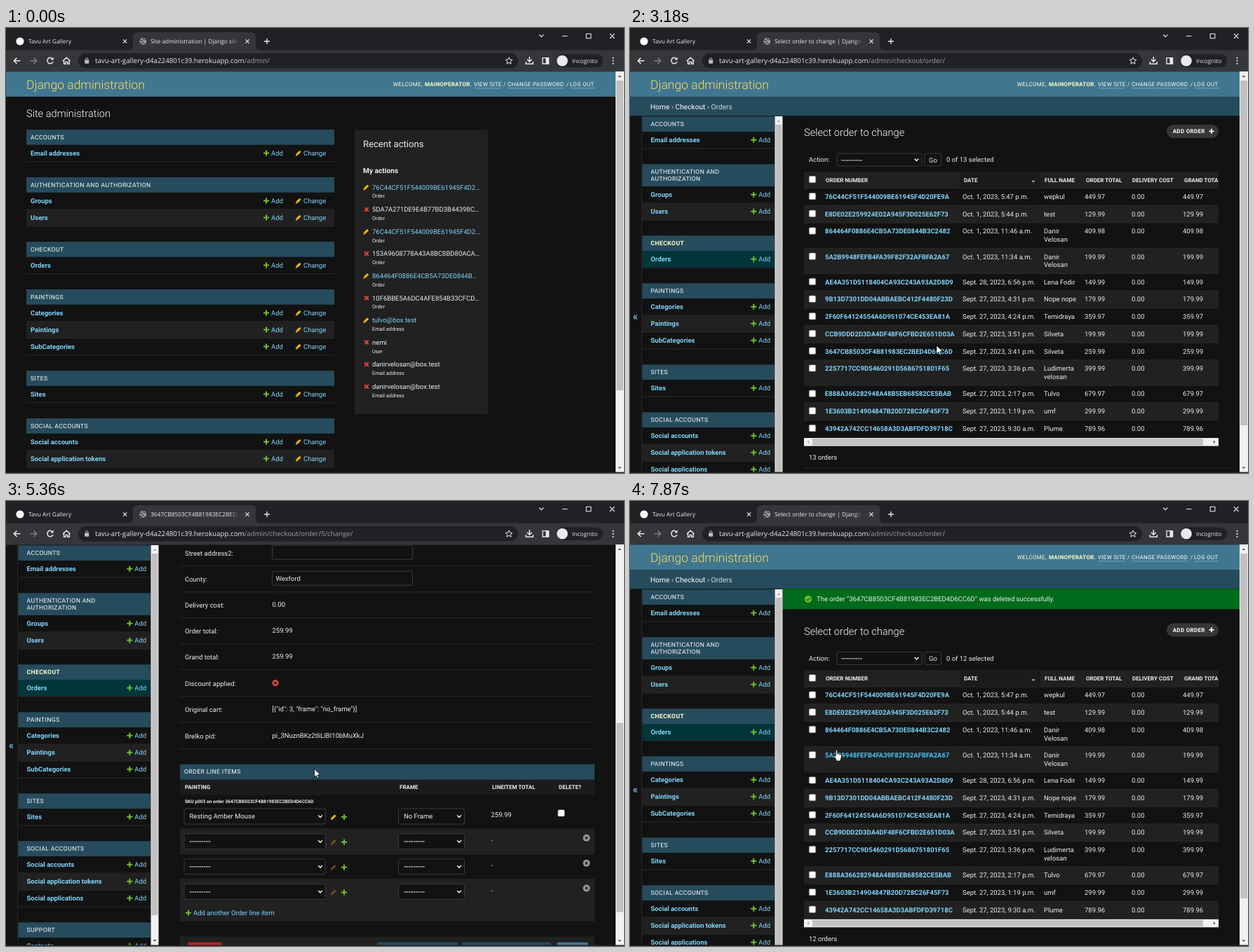
These frames come from a looping animation (881 by 635 pixels, 8000 ms). An HTML page:

```html
<!DOCTYPE html>
<html lang="en">
<head>
<meta charset="utf-8">
<title>Admin walkthrough</title>
<style>
html, body { margin: 0; width: 100%; height: 100%; overflow: hidden; background: #121212; }
svg { display: block; width: 100vw; height: 100vh; font-family: Roboto, sans-serif; text-rendering: geometricPrecision; }
.ui { font-family: "Open Sans", sans-serif; }
.on { fill: #4ac1f7; }
rect.on { fill: #a41515; }
</style>
</head>
<body>
<svg id="stage" viewBox="0 0 881 635"></svg>
<script>
const LOOP = 8000;
const BLUE = '#81d4fa', TEAL = '#264b5d', STEEL = '#417690', DIM = '#212121', LINE = '#2a2a2a',
      TEXT = '#eee', GREEN = '#70bf2b', GOLD = '#efb80b', RED = '#dd4646', UI = '#e8eaed';
const HASH = '3647CB8503CF4B81983EC2BED4D6CC6D';
const HOST = 'tavu-art-gallery-d4a224801c39.herokuapp.com';

// Drawing helpers; text is placed by the vertical centre of its capitals.
const rect = (x, y, w, h, fill, r = 0, more = '') =>
  `<rect x="${x}" y="${y}" width="${w}" height="${h}" rx="${r}" fill="${fill}" ${more}/>`;
const text = (x, cy, s, size = 9.5, fill = TEXT, weight = 400, more = '') =>
  `<text x="${x}" y="${cy + size * .355}" font-size="${size}" fill="${fill}" font-weight="${weight}" ${more}>${s}</text>`;
const path = (d, stroke, width = 1.2, fill = 'none', more = '') =>
  `<path d="${d}" stroke="${stroke}" stroke-width="${width}" fill="${fill}" ${more}/>`;
const circle = (x, y, r, fill, more = '') => `<circle cx="${x}" cy="${y}" r="${r}" fill="${fill}" ${more}/>`;
const hit = (x1, x2, y1, y2) => `data-hit="${x1},${x2},${y1},${y2}"`;
const rule = (x, y, w) => rect(x, y - .5, w, 1, LINE);
const upper = (x, cy, s, weight = 400, fill = '#fff') =>
  text(x, cy, s, 8.7, fill, weight, 'letter-spacing=".365"');
const plus = (x, y, c = GREEN, r = 4, w = 2) => path(`M${x - r} ${y}h${2 * r}M${x} ${y - r}v${2 * r}`, c, w);
const cross = (x, y, c, r, w) => path(`M${x - r} ${y - r}l${2 * r} ${2 * r}m0 ${-2 * r}l${-2 * r} ${2 * r}`, c, w);
const pencil = (x, y, dim) => `<g opacity="${dim ? .35 : 1}">` +
  path(`M${x - 2.4} ${y + 2.2}L${x + 2.6} ${y - 2.6}`, GOLD, 3) +
  path(`M${x - 4.2} ${y + 4.2}l.8 -3 2.2 2.2Z`, 'none', 0, GOLD) + '</g>';
const chevron = (x, y) => path(`M${x - 2.8} ${y - 1.5}l2.8 2.9 2.8 -2.9`, '#fff', 1.4);
const box = (x, y, w, h) => rect(x, y, w, h, '#121212', 2.5, 'stroke="#3a3a3a" stroke-width="1"');
const select = (x, cy, w, s = '---------', h = 22, pad = 7.5) =>
  box(x, cy - h / 2, w, h) + (s[0] === '-' ? text(x + pad, cy, s, 10.2, '#fff', 500) : text(x + pad, cy, s)) +
  chevron(x + w - 7.5, cy);
const check = (x, cy) => rect(x - 4.7, cy - 4.7, 9.4, 9.4, '#fff', 1.5, 'stroke="#767676" stroke-width=".6"');
const pill = (x, y, w, s, pad) =>
  rect(x, y, w, 19, '#363636', 9.5) + text(x + pad, y + 9.2, s, 8, '#fff', 700, 'letter-spacing=".3"');
const tri = (x, y, dx, dy, c = '#505050') => path(
  dx ? `M${x - dx} ${y - 2.6}v5.2l${2.4 * dx} -2.6Z` : `M${x - 2.6} ${y - dy}h5.2l-2.6 ${2.4 * dy}Z`, 'none', 0, c);

const apps = [
  ['ACCOUNTS', 'Email addresses'],
  ['AUTHENTICATION AND AUTHORIZATION', 'Groups', 'Users'],
  ['CHECKOUT', 'Orders'],
  ['PAINTINGS', 'Categories', 'Paintings', 'SubCategories'],
  ['SITES', 'Sites'],
  ['SOCIAL ACCOUNTS', 'Social accounts', 'Social application tokens', 'Social applications'],
  ['SUPPORT', 'Contacts']
];

function modules(x, w, y, side) {
  const pad = side ? 12 : 6, addX = side ? 176.3 : 371;
  return apps.map(([name, ...models]) => {
    const tall = side && name.length > 20 ? 10 : 0;
    const current = side && name === 'CHECKOUT';
    let out = rect(x, y, w, 21.7 + tall, TEAL);
    if (tall) out += upper(x + pad, y + 10.5, 'AUTHENTICATION AND') + upper(x + pad, y + 21, 'AUTHORIZATION');
    else out += upper(x + pad, y + 11, name, current ? 700 : 400, current ? '#ffc' : '#fff');
    models.forEach((model, i) => {
      const top = y + 21.7 + tall + 24 * i, cy = top + 11.8;
      if (current) out += rect(x, top, w, 24, '#00363a');
      else if (i % 2) out += rect(x, top, w, 24, DIM);
      out += rule(x, top + 24, w) + text(x + pad, cy, model, 9.5, BLUE, 700, side ? '' : hit(x + pad, x + 40, cy - 6, cy + 6));
      out += plus(addX, cy) + text(addX + 7, cy, 'Add', 9.5, BLUE);
      if (!side) out += pencil(417, cy) + text(424, cy, 'Change', 9.5, BLUE);
    });
    y += 44 + tall + 24 * models.length;
    return out;
  }).join('');
}

function header(crumbs) {
  const small = (x, s, fill, weight) => text(x, 80.5, s, 7.95, fill, weight, 'letter-spacing=".33"');
  const tool = (x, s, w) => small(x, s, '#fff') + rect(x, 85.5, w, .8, '#8fb0c2');
  let out = rect(0, 62, 869, 36, STEEL) + text(29, 80.5, 'Django administration', 17.5, '#f5dd5d', 300) +
    small(552, 'WELCOME,', '#ffc') + small(597, 'MAINOPERATOR.', '#ffc', 700) +
    tool(667, 'VIEW SITE', 39) + tool(715, 'CHANGE PASSWORD', 81) + tool(804, 'LOG OUT', 35) +
    small(709, '/', '#ffc') + small(799, '/', '#ffc');
  if (crumbs) {
    const last = crumbs.length - 1;
    out += rect(0, 98, 869, 27.3, TEAL) + text(29, 112, crumbs.map((c, i) =>
      i < last ? `<tspan fill="#fff">${c}</tspan>` : c).join(' › '), 10.2, '#c4dce8');
  }
  return out;
}

function dashboard() {
  const hashes = ['+76C44CF51F544009BE61945F4D2…', '5DA7A271DE9E4B77BD3B44398C…', '+76C44CF51F544009BE61945F4D2…',
    '153A9608778A43A8BC8BD80ACA…', '+864464F0886E4CB5A73DE0844B…', '10F6BBE5A6DC4AFE854B33CFCD…'].map(h => [h, 'Order']);
  const mail = ['danirvelosan@box.test', 'Email address'];
  const actions = [...hashes, ['+tulvo@box.test', 'Email address'], ['nemi', 'User'], mail, mail];
  return header() + text(29, 122, 'Site administration', 14.6, '#fff', 300) + modules(29, 439, 145, false) +
    rect(497, 145.5, 190, 405.5, DIM) + text(509, 165, 'Recent actions', 13.1) + text(509, 203, 'My actions', 10.2, TEXT, 700) +
    actions.map(([s, kind], i) => {
      const cy = 227.3 + 31.6 * i, changed = s[0] === '+';
      return (changed ? pencil(513.5, cy) : cross(514, cy, RED, 2.8, 2)) +
        text(522, cy, s.replace('+', ''), 9.5, changed ? BLUE : TEXT) + text(522, cy + 12.6, kind, 7.3);
    }).join('');
}

const orders = `76C44CF51F544009BE61945F4D20FE9A|Oct. 1, 2023, 5:47 p.m.|wepkul|449.97
E8DE02E259924E02A945F3D025E62F73|Oct. 1, 2023, 5:44 p.m.|test|129.99
864464F0886E4CB5A73DE0844B3C2482|Oct. 1, 2023, 11:46 a.m.|Danir/Velosan|409.98
5A2B9948FEFB4FA39F82F32AFBFA2A67|Oct. 1, 2023, 11:34 a.m.|Danir/Velosan|199.99
AE4A351D5118404CA93C243A93A2D8D9|Sept. 28, 2023, 6:56 p.m.|Lena Fodir|149.99
9B13D7301DD04ABBAEBC412F4480F23D|Sept. 27, 2023, 4:31 p.m.|Nope nope|179.99
2F60F64124554A6D951074CE453EA81A|Sept. 27, 2023, 4:24 p.m.|Temidraya|359.97
CCB9DDD2D3DA4DF48F6CFBD2E651D03A|Sept. 27, 2023, 3:51 p.m.|Silveta|199.99
${HASH}|Sept. 27, 2023, 3:41 p.m.|Silveta|259.99
2257717CC9D5460291D5686751801F65|Sept. 27, 2023, 3:36 p.m.|Ludimerta/velosan|399.99
E888A366282948A48B5EB68582CE5BAB|Sept. 27, 2023, 2:17 p.m.|Tulvo|679.97
1E3603B214904847B20D728C26F45F73|Sept. 27, 2023, 1:19 p.m.|umf|299.99
43942A742CC14658A3D3ABFDFD39718C|Sept. 27, 2023, 9:30 a.m.|Plume|789.96`.split('\n').map(l => l.split('|'));

function orderList(rows, dy, note) {
  const heads = [[279, 'ORDER NUMBER'], [476, 'DATE'], [591, 'FULL NAME'], [650, 'ORDER TOTAL'], [716, 'DELIVERY COST'], [790, 'GRAND TOTAL']];
  let out = header(['Home', 'Checkout', 'Orders']);
  if (note) out += rect(218, 125.3, 651, 29, '#006b1b') + circle(254, 140, 5, GREEN) +
    path('M251.5 140l1.9 2 3.3 -3.8', '#006b1b', 1.3) + text(266, 140, note, 9.5);
  out += text(248, dy + 149, 'Select order to change', 14.6, '#fff', 300) + pill(765, dy + 138, 74, 'ADD ORDER', 8.7) +
    plus(829, dy + 147.3, '#fff', 3.5, 1.8) + text(255, dy + 188, 'Action:') +
    select(295, dy + 188, 121, '---------', 18, 6) + box(420, dy + 179, 23.5, 18) + text(426, dy + 188.3, 'Go') +
    text(451, dy + 188, `0 of ${rows.length} selected`) +
    rect(248, dy + 205, 591, 23.7, DIM) + rect(470, dy + 205, 115, 23.7, '#1b1b1b') + check(260, dy + 216) +
    tri(575, dy + 219, 0, 1.3, '#aaa') + heads.map(([x, s]) => text(x, dy + 217, s, 8, TEXT, 700)).join('');
  let y = dy + 228.6;
  rows.forEach(([id, date, name, total], i) => {
    const names = name.split('/'), h = names.length > 1 ? 36.2 : 24.7, cy = y + 12;
    if (i % 2) out += rect(248, y, 591, h, DIM);
    out += rule(248, y, 591) + check(260, cy - .5) + text(278, cy, id, 9.5, BLUE, 700, hit(278, 462, cy - 7.5, cy + 7.5)) +
      text(474, cy, date) + names.map((n, k) => text(590, cy + 11.8 * k, n)).join('') +
      text(648, cy, total) + text(715, cy, '0.00') + text(788, cy, total);
    y += h;
  });
  return out + rect(839, dy + 205, 30, 24, '#121212') + rect(248, y + .8, 591, 11.5, '#f1f1f1') +
    rect(260, y + 1.8, 557, 9.5, '#c1c1c1') + tri(254, y + 6.5, -1, 0, '#a3a3a3') + tri(833, y + 6.5, 1, 0) +
    text(255, y + 28.8, `${rows.length} orders`) + rule(248, y + 44, 607);
}

// Field kinds: "=" plain value, "_" input, "v" drop-down, "x" negative icon; "*" marks a required label.
const fields = [
  ['Order number:', '=' + HASH, 228.5], ['User profile:', 'v---------', 267], ['Date:', '=Sept. 27, 2023, 3:41 p.m.', 304.5],
  ['*Full name:', '_Silveta', 342], ['*Email:', '_silvetavelosan@box.test', 379], ['*Phone number:', '_0550100123', 416.5],
  ['*Country:', 'vCyprus', 455], ['Postcode:', '_Q00x0x0', 492], ['*Town or city:', '_Wexford', 529.5],
  ['*Street address1:', '_Brenmorvale', 566.5], ['Street address2:', '_', 604], ['County:', '_Wexford', 641],
  ['Delivery cost:', '=0.00', 678], ['Order total:', '=259.99', 715], ['Grand total:', '=259.99', 752], ['Discount applied:', 'x', 790],
  ['Original cart:', '=[{"id": 3, "frame": "no_frame"}]', 827], ['Brelko pid:', '=pi_3NuznBKz2tliLlBI10bMuXkJ', 865]
];

function changeForm() {
  let out = header(['Home', 'Checkout', 'Orders', HASH]) + text(248, 149, 'Change order', 14.6, '#fff', 300) +
    text(248, 179, HASH, 11.68, '#fff', 700) + pill(787, 157.5, 52, 'HISTORY', 8);
  for (const [label, value, end] of fields) {
    const cy = end - 19.5, kind = value[0], s = value.slice(1);
    out += rule(248, end, 591) + text(255, end - 18, label.replace('*', ''), 9.5, TEXT, label[0] === '*' ? 700 : 400);
    if (kind === '=') out += text(379.5, cy, s);
    if (kind === '_') out += box(379.5, cy - 10, 200, 20) + text(384.5, cy, s);
    if (kind === 'v') out += select(379.5, cy, s === 'Cyprus' ? 223.5 : 86, s);
    if (kind === 'x') out += circle(384, cy + .5, 4.6, RED) + cross(384, cy + .5, '#121212', 1.7, 1.3);
  }
  out += rect(248, 887, 591, 22, TEAL) + upper(254, 897.5, 'ORDER LINE ITEMS') + rect(248, 909, 591, 22, '#1b1b1b') +
    [[255, 'PAINTING'], [561, 'FRAME'], [693, 'LINEITEM TOTAL'], [788, 'DELETE?']].map(([x, s]) => text(x, 919.5, s, 8, TEXT, 700)).join('') +
    text(255, 940, 'SKU p003 on order ' + HASH, 6.6, TEXT, 700);
  [961.3, 997, 1033, 1068.7].forEach((cy, i) => {
    if (i % 2) out += rect(248, cy - 18, 591, 36, DIM);
    out += rule(248, cy + 18, 591) + select(254, cy, 201.5, i ? undefined : 'Resting Amber Mouse') + pencil(467, cy + 1, i) +
      plus(482, cy + 1) + select(559.5, cy, 94, i ? undefined : 'No Frame') + text(691.5, cy - 2, i ? '-' : '259.99');
    out += i ? circle(827.5, cy - 5, 5, '#999') + cross(827.5, cy - 5, DIM, 1.8, 1.4) : check(791.5, cy - 4.6);
  });
  const button = (x, w, s, fill, weight = 400, more = '') => rect(x, 1141, w, 25, fill, 3, more) +
    text(x + w / 2, 1153.5, s, 9.5, '#fff', weight, 'text-anchor="middle"');
  return out + rect(248, 1087, 591, 24, DIM) + plus(260, 1099) + text(267, 1099, 'Add another Order line item', 9.5, BLUE) +
    rect(248, 1133, 591, 42, DIM) + button(259, 49, 'Delete', '#ba2121', 400, hit(259, 308, 1141, 1166)) +
    button(529, 116, 'Save and add another', TEAL) + button(650, 127, 'Save and continue editing', TEAL) +
    button(785, 45, 'SAVE', STEEL, 700);
}

function confirmDelete() {
  const item = (x, cy, s) => rect(x - 10, cy - 1.3, 2.8, 2.8, TEXT) + text(x, cy, s);
  return header(['Home', 'Checkout', 'Orders', HASH, 'Delete']) +
    text(248, 149, 'Are you sure?', 14.6, '#fff', 300) +
    text(248, 179, `Are you sure you want to delete the order "${HASH}"? All of the following related items will be`, 10.2) +
    text(248, 193.5, 'deleted:', 10.2) + text(248, 219.5, 'Summary', 11.68, '#fff', 700) +
    item(277, 240, 'Orders: 1') + item(277, 256, 'Order line items: 1') + text(248, 283, 'Objects', 11.68, '#fff', 700) +
    item(277, 303.3, `Order: <tspan fill="${BLUE}">${HASH}</tspan>`) + item(306, 321, 'Order line item: SKU p003 on order ' + HASH) +
    rect(248, 339.5, 74.5, 25.5, '#ba2121', 3, hit(248, 322, 340, 365)) + text(258.5, 352.3, "Yes, I'm sure", 9.5, '#fff') +
    rect(333, 339.5, 94.5, 25.5, '#333', 3) + text(343.5, 352.3, 'No, take me back', 9.5, '#fff');
}

const sidebar = () => rect(16, 126, 1, 600, LINE) +
  text(7.6, 411, '«', 16, BLUE, 400, 'text-anchor="middle"') + modules(17.5, 188.5, 126.3, true) +
  rect(206.5, 126, 11, 572, '#f1f1f1') + rect(207.5, 138, 9, 516, '#c1c1c1') +
  tri(212, 133, 0, -1, '#a3a3a3') + tri(212, 690, 0, 1);

function browser() {
  const close = (x, y = 19) => cross(x, y, UI, 2.6, 1.2);
  return rect(0, 0, 881, 32, '#202124') + path('M174 32q7 0 7 -7v-12q0 -7 7 -7h161q7 0 7 7v12q0 7 7 7Z', 'none', 0, '#35363a') +
    rect(0, 31.5, 881, 31, '#35363a') + circle(20, 19, 5.6, '#fff') +
    `<g class="ui">${text(32, 19, 'Tavu Art Gallery', 8.35, UI)}${text(206, 19, '', 8.35, UI, 400, 'id="title"')}` +
    rect(319, 10, 13, 18, 'url(#fade)') + rect(332, 10, 20, 18, '#35363a') + rect(103, 36, 627, 21.5, '#202124', 10.7) +
    text(127, 46.8, '', 9.75, UI, 400, 'id="url"') + rect(784, 37.5, 67, 18.5, '#202124', 9.2) + text(807, 46.8, 'Incognito', 8.35, UI) + '</g>' +
    circle(793, 46.7, 7.8, UI) + close(169.5) + close(344) + plus(372, 19, UI, 4, 1.3) +
    `<g id="globe">${circle(0, 0, 4.9, '#9aa0a6')}${path('M-4.5 -1.5q4 -.5 4 1.5t3 3M0 -4.8q0 2.5 4 2.8M-3.5 1l2.5 3.5', '#35363a', 1.1)}</g>` +
    path('M760 9.5l3.2 3.2 3.2 -3.2M793 11.5h7.5M827.2 8.2h6.6v6.6h-6.6ZM860.8 8.2l6.8 6.8m0 -6.8l-6.8 6.8', UI, 1.1) +
    path('M20.5 46.8h-9m4 -4.2l-4.2 4.2 4.2 4.2', UI, 1.5) + path('M34.5 46.8h9m-4 -4.2l4.2 4.2 -4.2 4.2', '#7d7f83', 1.5) +
    path('M66.6 44.2a4.2 4.2 0 1 0 .4 4', UI, 1.5) + path('M67.6 41.6v4h-4Z', 'none', 0, UI) +
    path('M81 47l5.3 -4.8 5.3 4.8M82.6 46v5.4h2.5v-3h2.6v3h2.5v-5.4', UI, 1.4) +
    rect(112.2, 45.6, 6, 5.2, '#bdc1c6', 1) + path('M113.6 46v-1.6a1.6 1.6 0 0 1 3.2 0v1.6', '#bdc1c6', 1) +
    path('M717 41.8l1.4 3.3 3.6 .3 -2.8 2.3 .9 3.5 -3.1 -1.9 -3.1 1.9 .9 -3.5 -2.8 -2.3 3.6 -.3Z', UI, 1) +
    path('M746.3 41v7m-3.4 -3.2l3.4 3.4 3.4 -3.4M741.3 48v3.2h10v-3.2', UI, 1.5) +
    path('M765 42.6h8.6v8.4h-8.6Z', UI, 1.3) + rect(769.5, 42.6, 4.2, 8.4, UI) +
    [42.8, 46.8, 50.8].map(y => circle(865.5, y, 1.1, UI)).join('') +
    rect(869, 62, 12, 572, '#f1f1f1') + rect(870, 75, 10, 1, '#c1c1c1', 0, 'id="thumb"') +
    tri(874.8, 69, 0, -1) + tri(874.8, 627.5, 0, 1) + rect(0, 633.6, 881, 1.4, '#202124');
}

const listTitle = 'Select order to change | Django', orderPath = '/admin/checkout/order/';
const pages = [
  { at: 0, title: 'Site administration | Django site', url: '/admin/', thumb: 442, body: dashboard() },
  { at: 1620, title: listTitle, url: orderPath, thumb: 492, body: orderList(orders, 0) },
  { at: 3640, title: HASH.slice(0, 26), url: orderPath + '5/change/', thumb: 270, body: changeForm() },
  { at: 6000, title: 'Are you sure? | Django site admin', url: orderPath + '5/delete/', thumb: 492, body: confirmDelete() },
  { at: 7490, title: listTitle, url: orderPath, thumb: 492,
    body: orderList(orders.filter(o => o[0] !== HASH), 36.5, `The order “${HASH}” was deleted successfully.`) }
];
const loading = [[1540, 1900], [3560, 4100], [5900, 6400], [7410, 7800]];
const moves = [[500, 628, 549], [580, 495, 566], [690, 495, 566], [1370, 60, 337], [1600, 60, 337], [1780, 69, 346], [1860, 69, 346],
  [2310, 400, 288], [2750, 468, 370], [3180, 437, 453], [3240, 437, 453], [3480, 425, 462], [4270, 425, 462], [4730, 439.5, 380],
  [4860, 439.5, 380], [5000, 439.5, 382], [5510, 439.5, 382], [5850, 281, 567], [6400, 281, 567], [7000, 294.5, 355.5], [LOOP, 294.5, 355.5]];

const stage = document.getElementById('stage');
stage.innerHTML = `<defs><linearGradient id="fade"><stop stop-color="#35363a" stop-opacity="0"/><stop offset="1" stop-color="#35363a"/></linearGradient></defs>` +
  rect(0, 0, 881, 635, '#121212') + pages.map(p => `<g class="page">${p.body}</g>`).join('') +
  `<g id="side">${sidebar()}</g>` + browser() + '<g id="cursor" stroke-linejoin="round">' +
  path('M0 0V12L2.8 9.4 4.7 13.6 6.6 12.8 4.8 8.7H8.6Z', '#000', .8, '#fff', 'id="arrow"') +
  path('M-1.2 1Q-1.2 0 0 0T1.2 1V5L5.5 6Q7 6.4 7 8L6.3 12 5.4 15.5H0L-1.5 12 -4 8.8Q-4 7.3 -2.6 7.6L-1.2 9Z', '#000', .8, '#fff', 'id="hand"') + '</g>';
const $ = id => document.getElementById(id);
const show = (el, yes) => el.setAttribute('visibility', yes ? 'visible' : 'hidden');
[...stage.querySelectorAll('.page')].forEach((g, i) => {
  pages[i].g = g;
  pages[i].links = [...g.querySelectorAll('[data-hit]')].map(el => ({ el, area: el.dataset.hit.split(',').map(Number) }));
});

const clamp = v => Math.max(0, Math.min(1, v));
const smooth = v => (v = clamp(v)) * v * (3 - 2 * v);
function cursorAt(t) {
  const i = Math.max(1, moves.findIndex(m => m[0] > t));
  const [t0, x0, y0] = moves[i - 1], [t1, x1, y1] = moves[i], k = smooth((t - t0) / (t1 - t0));
  return [x0 + (x1 - x0) * k, y0 + (y1 - y0) * k];
}

let current;
function draw() {
  const t = performance.now() % LOOP;
  const page = pages.findLast(p => t >= p.at);
  const scroll = page === pages[2] ? 585 * smooth((t - 4860) / 644) : 0;
  if (page !== current) {
    current = page;
    pages.forEach(p => show(p.g, p === page));
    show($('side'), page !== pages[0]);
    $('title').textContent = page.title;
    $('url').innerHTML = `${HOST}<tspan fill="#9aa0a6">${page.url}</tspan>`;
    $('thumb').setAttribute('height', page.thumb);
  }
  page.g.setAttribute('transform', `translate(0 ${-scroll})`);
  $('side').setAttribute('transform', `translate(0 ${-Math.min(scroll, 63)})`);
  $('thumb').setAttribute('y', 75 + scroll * .4725);
  const busy = loading.some(([a, b]) => t >= a && t < b);
  $('globe').setAttribute('transform', `translate(195.3 19) scale(${busy ? .7 : 1})`);

  const [x, y] = cursorAt(t);
  let over = false;
  for (const { el, area: [x1, x2, y1, y2] } of page.links) {
    const on = t >= 500 && x >= x1 && x <= x2 && y + scroll >= y1 && y + scroll <= y2;
    el.classList.toggle('on', on);
    over = over || on;
  }
  $('cursor').setAttribute('transform', `translate(${x} ${y})`);
  show($('arrow'), t >= 500 && !over);
  show($('hand'), t >= 500 && over);
  requestAnimationFrame(draw);
}
draw();
</script>
</body>
</html>
```
